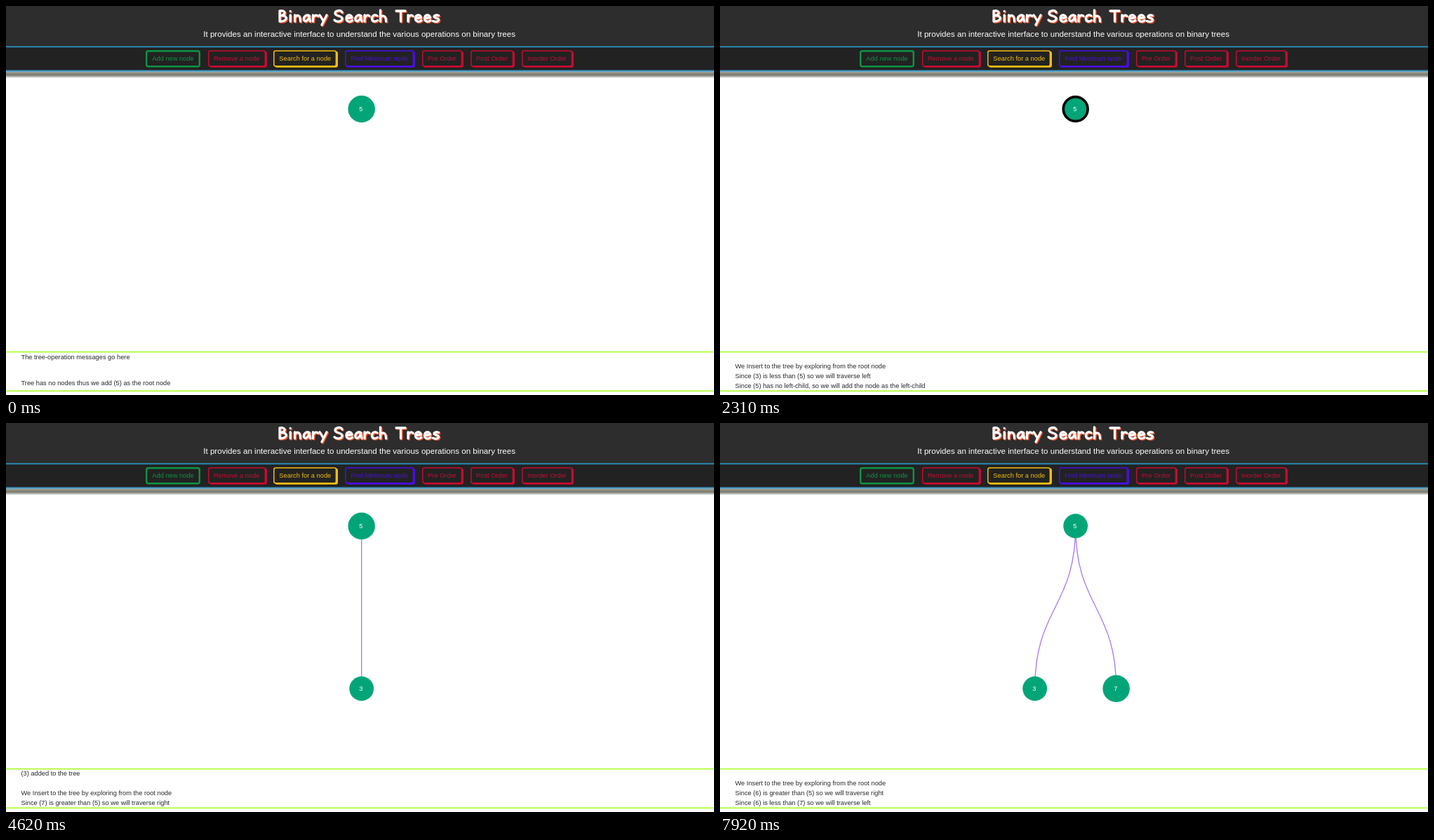
Animation of 1009 by 555 pixels, one loop 8 s. Source, as an HTML page with a canvas:

```html
<!DOCTYPE html>
<html lang="en">
<head>
<meta charset="utf-8">
<title>Binary Search Trees</title>
<style>
html, body { margin: 0; width: 100%; height: 100%; overflow: hidden; background: #fff; }
canvas { display: block; }
</style>
</head>
<body>
<canvas id="stage" width="1009" height="555" role="img" aria-label="Binary Search Trees"></canvas>
<script>
const ctx = document.getElementById('stage').getContext('2d');
const W = 1009, H = 555, LOOP = 8000;
const SANS = '"Liberation Sans", Arial, sans-serif';
const NODE = '#02a577', BLACK = '#000', ADDED = '#006b08';

// Brush strokes of the handwritten heading, baseline at y = 0: [advance, path]
const GLYPHS = {
  B: [15, 'M2 -16V-1M2 -16C10 -18 12 -11 4 -9.5C14 -10 14 -1 2 -1'],
  i: [6.5, 'M2.2 -10V-1M2.2 -15.5v.1'],
  n: [13, 'M2 -10V-1M2 -6C4 -11 10 -12 10 -1'],
  a: [13, 'M10 -9C5 -12 1 -7 2 -3C3 0 8 -1 9.5 -8L11 -1'],
  r: [10.5, 'M2 -10V-1M2 -6C4 -10 7 -11 9 -8.5'],
  y: [13, 'M1 -10L6 -2M11 -10L4 4'],
  S: [16, 'M12 -14C10 -18 2 -17 2 -12.5C2 -8 13 -10 12 -4.5C11 0 4 0 1 -3'],
  e: [13, 'M2 -5.5L10 -6.5C9 -12 2 -11 2 -5C2 0 8 0 10.5 -2.5'],
  c: [12, 'M9.5 -9C5 -12 1.5 -8 2 -4.5C2.5 0 7 -.5 10 -2.5'],
  h: [13, 'M2 -17V-1M2 -6C4 -10 10 -11 10 -1'],
  T: [16, 'M1 -16H14M7.5 -16V-1'],
  s: [12, 'M9 -9.5C5 -11 1 -9 3 -6.8C5 -5.5 9.5 -6 9 -3C8 0 4 -.5 1 -1.5']
};
const HEADING = [['Binary', 388], ['Search', 467], ['Trees', 555]];

// label, left, right, colour, text centre
const BUTTONS = [
  ['Add new node', 199, 277, '#0c9444', 238],
  ['Remove a node', 288, 372, '#c90a32', 328.7],
  ['Search for a node', 381, 473, '#f5be12', 426.3],
  ['Find Minimum node', 483, 583, '#4a0ee8', 532],
  ['Pre Order', 593, 652, '#c90a32', 621.5],
  ['Post Order', 662, 725, '#c90a32', 692.5],
  ['Inorder Order', 735, 809, '#c90a32', 771]
];

const START = 'We Insert to the tree by exploring from the root node';
const compare = (a, b) => a < b
  ? `Since (${a}) is less than (${b}) so we will traverse left`
  : `Since (${a}) is greater than (${b}) so we will traverse right`;
const vacant = (n, side) =>
  `Since (${n}) has no ${side}-child, so we will add the node as the ${side}-child`;
const added = n => `(${n}) added to the tree`;

const LOG = [
  'Tree has no nodes thus we add (5) as the root node',
  '', START, compare(3, 5), vacant(5, 'left'), added(3),
  '', START, compare(7, 5), vacant(5, 'right'), added(7),
  '', START, compare(6, 5), compare(6, 7)
];

// start time, visible log lines, nodes in the tree, active node, ring colour
const STEPS = [
  [0, 1, 1, 5, null],
  [990, 3, 1, 5, BLACK],
  [1320, 4, 1, 5, BLACK],
  [1650, 4, 1, 5, null],
  [1980, 5, 1, 5, BLACK],
  [2640, 6, 2, 3, ADDED],
  [3300, 6, 2, 3, null],
  [3960, 8, 2, 5, BLACK],
  [4290, 9, 2, 5, BLACK],
  [4620, 9, 2, 5, null],
  [4950, 10, 2, 5, BLACK],
  [5610, 11, 3, 7, ADDED],
  [6270, 11, 3, 7, null],
  [6600, 13, 3, 5, BLACK],
  [6930, 14, 3, 5, BLACK],
  [7260, 14, 3, 5, null],
  [7590, 15, 3, 7, BLACK],
  [7920, 15, 3, 7, null]
];

const ROOT = { key: 5, x: 506.7, y: 147 };
const child = (key, dx) => ({ key, x: ROOT.x + dx, y: 379 });
const CHILDREN = [[], [child(3, 0)], [child(3, -58), child(7, 58)]];

function bar(y, h, fill) {
  ctx.fillStyle = fill;
  ctx.fillRect(0, y, W, h);
}

function label(str, x, y, size, fill, align = 'center') {
  ctx.font = `${size}px ${SANS}`;
  ctx.textAlign = align;
  ctx.fillStyle = fill;
  ctx.fillText(str, x, y);
}

function box(x, y, w, h, r) {
  ctx.beginPath();
  ctx.roundRect(x, y, w, h, r);
}

function heading(dx, dy, color) {
  ctx.strokeStyle = color;
  ctx.lineWidth = 3.3;
  ctx.lineCap = ctx.lineJoin = 'round';
  for (const [word, left] of HEADING) {
    let x = left;
    for (const ch of word) {
      const [advance, path] = GLYPHS[ch];
      ctx.save();
      ctx.translate(x + dx, 23 + dy);
      ctx.stroke(new Path2D(path));
      ctx.restore();
      x += advance;
    }
  }
}

function button([str, x0, x1, color, cx], i) {
  const w = x1 - x0;
  ctx.strokeStyle = ctx.fillStyle = color;
  if (i === 0) {
    ctx.lineWidth = 2.4;
    box(x0 + 1.2, 64.2, w - 2.4, 22, 2.5);
    ctx.stroke();
  } else {
    box(x0 + 2, 64.5, w - 2, 23.3, 3);
    ctx.fill();
    ctx.lineWidth = 1.5;
    box(x0 + .8, 63.9, w - 3.4, 21.8, 2.5);
    ctx.fillStyle = '#222';
    ctx.fill();
    ctx.stroke();
  }
  label(str, cx, 78, 9.3, color);
}

function header() {
  bar(0, 58, '#2d2d2d');
  bar(58, 34, '#222');
  bar(57.3, 1.8, '#2790bd');
  const shade = ctx.createLinearGradient(0, 94, 0, 103);
  shade.addColorStop(0, '#a3a498');
  shade.addColorStop(.4, '#7b7b70');
  shade.addColorStop(.6, '#8d8d87');
  shade.addColorStop(1, '#fff');
  bar(94, 9, shade);
  bar(91.5, 2.3, '#3c94c0');
  heading(1.4, 1.2, '#f0532d');
  heading(0, 0, '#fff');
  label('It provides an interactive interface to understand the various operations on binary trees',
    503.6, 43.7, 11.6, '#fff');
  BUTTONS.forEach(button);
}

function link(a, b) {
  const mid = (a.y + b.y) / 2;
  ctx.beginPath();
  ctx.moveTo(a.x, a.y);
  ctx.bezierCurveTo(a.x, mid, b.x, mid, b.x, b.y);
  ctx.strokeStyle = '#a278f2';
  ctx.lineWidth = 1.3;
  ctx.stroke();
}

function node({ key, x, y }, active, ring) {
  ctx.beginPath();
  ctx.arc(x, y, 17.4, 0, Math.PI * 2);
  ctx.fillStyle = NODE;
  ctx.fill();
  if (key === active) {
    ctx.strokeStyle = ring || NODE;
    ctx.lineWidth = 3.7;
    ctx.stroke();
  }
  label(key, x - .8, y + 3.2, 9.3, '#fff');
}

function messages(count) {
  const line = (str, y) => label(str, 21.5, y, 9.27, '#24282c', 'left');
  if (count === 1) {
    line('The tree-operation messages go here', 504.2);
    line(LOG[0], 541.3);
  } else {
    const rows = LOG.slice(Math.max(0, count - 4), count);
    rows.forEach((str, i) => line(str, 544.8 - (rows.length - 1 - i) * 13.9));
    if (count === 3) return;
  }
}

function draw(t) {
  const [, lines, size, active, ring] = STEPS.findLast(s => s[0] <= t);
  bar(0, H, '#fff');
  header();
  const kids = CHILDREN[size - 1];
  kids.forEach(kid => link(ROOT, kid));
  [ROOT, ...kids].forEach(n => node(n, active, ring));
  messages(lines);
  bar(492.7, 1.7, '#adff2f');
  bar(548.4, 1.7, '#adff2f');
}

function tick() {
  draw(performance.now() % LOOP);
  requestAnimationFrame(tick);
}
tick();
</script>
</body>
</html>
```
